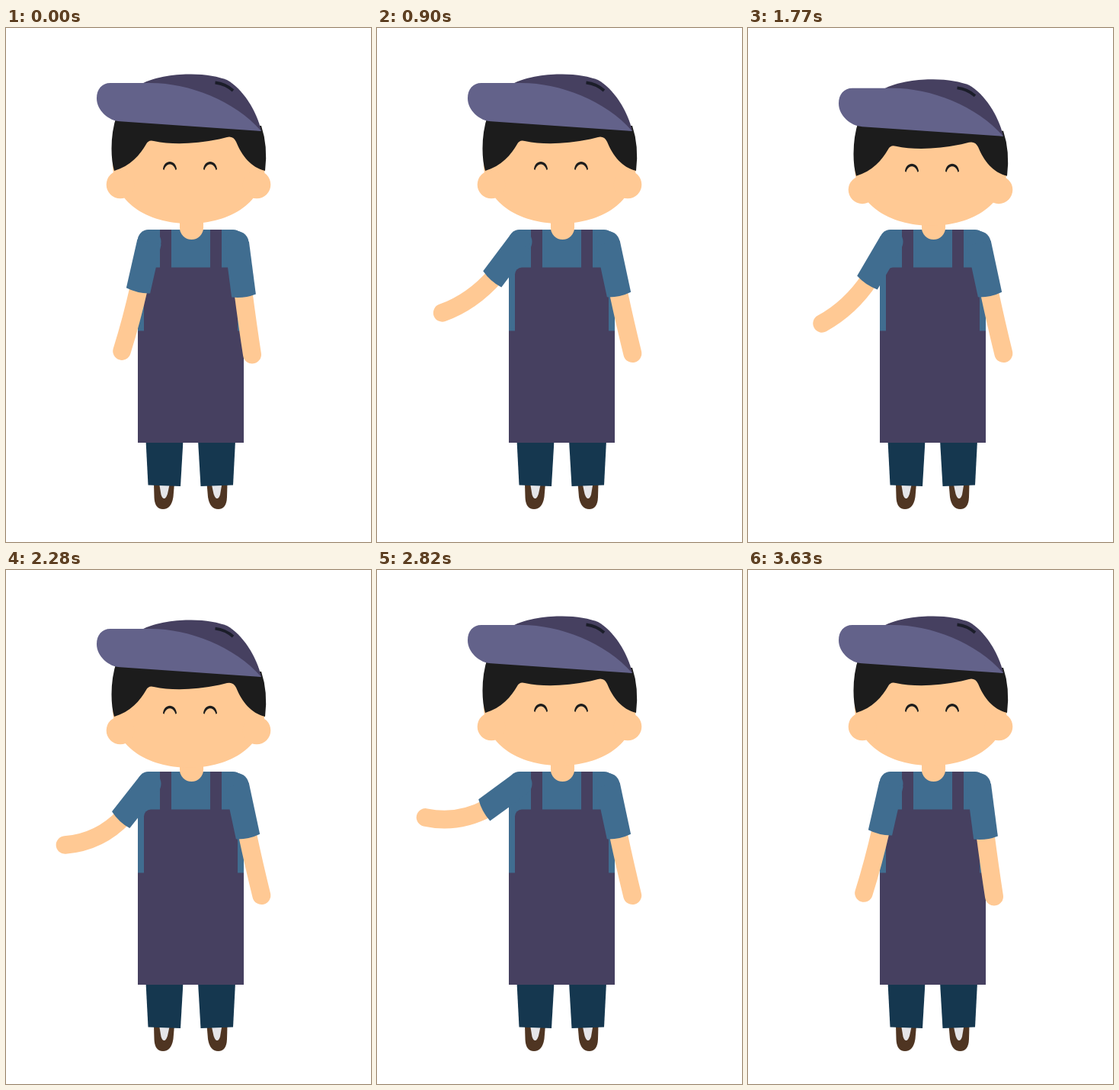
An HTML page with a canvas for the animation above (3660 ms loop, 479 by 673 pixels).

```html
<!DOCTYPE html>
<html lang="en">
<head>
<meta charset="utf-8">
<title>Waving shopkeeper</title>
<style>
html, body { margin: 0; width: 100%; height: 100%; overflow: hidden; background: #fff; }
canvas { display: block; width: 479px; height: 673px; }
</style>
</head>
<body>
<canvas id="stage" width="479" height="673"></canvas>
<script>
const ctx = document.getElementById('stage').getContext('2d');
const LOOP = 3660, STEP = 30;
const SKIN = '#ffc994', SHIRT = '#406d90', APRON = '#464060', BRIM = '#63628a';
const HAIR = '#1c1c1c', PANTS = '#15374f', SHOE = '#4f3522', SOCK = '#e5e5e8';

// Keys are [time, value]; values ease in and out between them.
const HAND = [[30, 14.1], [1260, 56], [1860, 39.5], [1960, 39.5], [2670, 74], [3645, 14.1]];
const SLEEVE = [[0, 12.8], [1000, 37.5], [1800, 30.5], [2050, 30.5], [2670, 56.5], [3645, 12.8]];
const HEAD = [[960, 0], [1860, 7], [2000, 7], [2790, 0]];
const FACE = [[1050, 0], [2000, 3.3], [2100, 3.3], [2790, 0]];
const RIGHT = [[0, 0], [900, 1], [2760, 1], [3645, 0]];

function at(keys, t) {
  if (t <= keys[0][0]) return keys[0][1];
  for (let i = 1; i < keys.length; i++) {
    const [t0, a] = keys[i - 1], [t1, b] = keys[i];
    if (t < t1) return a + (b - a) * (1 - Math.cos(Math.PI * (t - t0) / (t1 - t0))) / 2;
  }
  return keys[keys.length - 1][1];
}

function shape(color, d) {
  ctx.fillStyle = color;
  ctx.fill(new Path2D(d));
}

function rect(color, x, y, w, h, radii = 0) {
  ctx.fillStyle = color;
  ctx.beginPath();
  ctx.roundRect(x, y, w, h, radii);
  ctx.fill();
}

function disc(color, x, y, r) {
  ctx.fillStyle = color;
  ctx.beginPath();
  ctx.arc(x, y, r, 0, 2 * Math.PI);
  ctx.fill();
}

function line(color, width, d, cap = 'round') {
  ctx.strokeStyle = color;
  ctx.lineWidth = width;
  ctx.lineCap = cap;
  ctx.stroke(new Path2D(d));
}

// Angles are in degrees from straight down, positive towards the left.
function polar([x, y], deg, r) {
  const a = deg * Math.PI / 180;
  return [x - r * Math.sin(a), y + r * Math.cos(a)];
}

function arm(shoulder, cuff, hand, angle, tilt, width) {
  const R = 16, end = angle + tilt;
  line(SKIN, width, `M${polar(cuff, end, -6)} Q${polar(cuff, end, 40)} ${hand}`);
  disc(SHIRT, ...shoulder, R - 0.5);
  shape(SHIRT, `M${polar(shoulder, angle + 90, R)} L${polar(cuff, end + 90, R)}
    Q${polar(cuff, end, 4)} ${polar(cuff, end - 90, R)} L${polar(shoulder, angle - 90, R)}Z`);
}

function leftArm(t) {
  const shoulder = [188, 280], hand = at(HAND, t), angle = at(SLEEVE, t);
  const lift = angle - 12.8, bend = hand - angle;
  const cuff = polar(shoulder, angle, 65.8 - 0.2 * bend - 0.1 * lift);
  arm(shoulder, cuff, polar(shoulder, hand, 147.5 - 0.275 * (hand - 14.1)), angle, 0.19 * lift, 23.6);
}

function rightArm(t) {
  const k = at(RIGHT, t), shoulder = [303, 281.5];
  const cuff = [312 + 5.5 * k, 350.5 - 1.5 * k];
  const angle = -Math.atan2(cuff[0] - shoulder[0], cuff[1] - shoulder[1]) * 180 / Math.PI;
  arm(shoulder, cuff, [323 + 12.3 * k, 427.5 - 1.5 * k], angle, 0, 24);
}

function foot() {
  shape(SHOE, 'M194 596H221L219.5 614Q217 630 206 630Q195 630 194.5 614Z');
  shape(SOCK, 'M201 596H215L212 610Q210 616 207.5 616Q205 616 203.5 611Z');
  shape(PANTS, 'M183.5 540H232.5L229 600L186.5 598.5Z');
}

function body() {
  foot();
  ctx.save();
  ctx.translate(484.5, 0);
  ctx.scale(-1, 1);
  foot();
  ctx.restore();
  rect(SHIRT, 173, 264, 139, 140, [14, 14, 0, 0]);
  rect(APRON, 202, 264, 15, 55);
  rect(APRON, 268, 264, 15, 55);
  rect(APRON, 181, 313.5, 123, 90, [9, 9, 0, 0]);
  rect(APRON, 173, 396.5, 139, 146.5);
}

function head(drop, faceDrop) {
  rect(SKIN, 228, 240, 31, 37, [0, 0, 15.5, 15.5]);

  ctx.save();
  ctx.translate(0, faceDrop);
  shape(SKIN, 'M140 178C140 228 185 256 240 256S340 228 340 178L320 135H160Z');
  for (const x of [215, 268]) {
    shape(HAIR, `M${x - 9} 185C${x - 8} 171.5 ${x + 8} 171.5 ${x + 9} 185L${x + 7.5} 186
      C${x + 5} 176 ${x - 5} 176 ${x - 7.5} 186Z`);
  }
  ctx.restore();

  ctx.save();
  ctx.translate(0, drop);
  disc(SKIN, 150, 205, 18.3);
  disc(SKIN, 329, 205, 18.3);
  shape(HAIR, `M145 115Q138.5 135 138.5 158Q138.5 175 142 187C163 181 176 166 184 152
    Q187 146 194 148Q230 155.5 280 145.5L290 143Q298 141 302 149C310 168 321 182 340 187
    Q344 155 335 128Z`);
  shape(APRON, `M176 74C198 62.5 225 60.5 243 60.5C262 60.5 280 64 290 68
    C310 79 329 108 335 135L240 120Z`);
  shape(BRIM, `M137 72H190C240 72 300 95 335 135L150 122.3C135 122 119 108 119 92
    C119 80 126 72 137 72Z`);
  line('#1b1d29', 3.8, 'M274.5 71.5Q288 73 298 82', 'butt');
  ctx.restore();
}

function draw(now) {
  const t = Math.floor((now % LOOP) / STEP) * STEP;
  ctx.fillStyle = '#fff';
  ctx.fillRect(0, 0, 479, 673);
  body();
  leftArm(t);
  rightArm(t);
  head(at(HEAD, t), at(FACE, t));
}

const start = performance.now();
function tick() {
  draw(performance.now() - start);
  requestAnimationFrame(tick);
}
tick();
</script>
</body>
</html>
```
